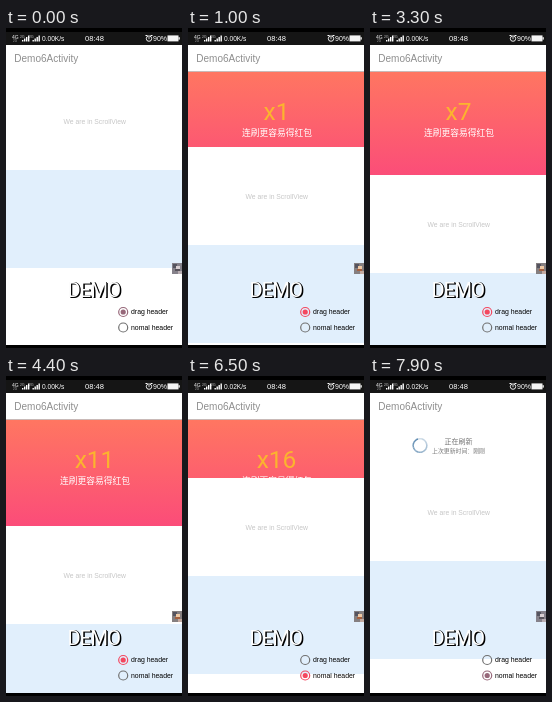
These frames come from a looping animation (176x320 px, 8000 ms). An HTML page with a canvas:

```html
<!DOCTYPE html>
<html lang="en">
<head>
<meta charset="utf-8">
<title>Pull to refresh demo</title>
<style>
html, body { margin: 0; width: 100%; height: 100%; overflow: hidden; background: #000; }
canvas { display: block; width: 176px; height: 320px; }
</style>
</head>
<body>
<canvas id="stage" width="176" height="320"></canvas>
<script>
const ctx = document.getElementById('stage').getContext('2d');
const LOOP = 8000, STEP = 100, TOP = 44, BOTTOM = 317;
const SANS = '"Liberation Sans", Arial, sans-serif';
const CJK = '"Noto Sans CJK SC", "Noto Sans CJK", sans-serif';
const ROBOTO = 'Roboto, sans-serif';

// [time, pull distance]
const PULL = [
  [0, 0], [100, 1], [300, 12], [600, 38], [900, 65], [1000, 75], [1200, 90],
  [1500, 99], [1900, 98], [2300, 102], [2800, 105], [3300, 103], [3800, 106],
  [4400, 106], [5000, 103], [5700, 105], [6200, 104], [6400, 88], [6500, 58],
  [6600, 30], [6700, 12], [6800, 3], [6900, 0], [7000, 0], [7300, 42],
  [7500, 60], [7700, 49], [7800, 45], [7900, 43]
];
// [time, swipe counter]
const COUNT = [[0, 1], [1000, 1], [1600, 2], [2100, 3], [2450, 4], [4250, 11], [5500, 15], [6100, 16]];

function sample(points, t) {
  const i = points.findIndex(p => p[0] > t);
  if (i < 0) return points[points.length - 1][1];
  const [t0, a] = points[i - 1], [t1, b] = points[i];
  return a + (b - a) * (t - t0) / (t1 - t0);
}

function rect(x, y, w, h, color) {
  ctx.fillStyle = color;
  ctx.fillRect(x, y, w, h);
}

function text(str, x, y, size, color, family = SANS, align = 'left', weight = 400) {
  ctx.font = `${weight} ${size}px ${family}`;
  ctx.textAlign = align;
  ctx.fillStyle = color;
  ctx.fillText(str, x, y);
}

function arc(x, y, r, color, width, from = 0, to = Math.PI * 2) {
  ctx.beginPath();
  ctx.arc(x, y, r, from, to);
  ctx.strokeStyle = color;
  ctx.lineWidth = width;
  ctx.stroke();
}

function dot(x, y, r, color) {
  ctx.beginPath();
  ctx.arc(x, y, r, 0, Math.PI * 2);
  ctx.fillStyle = color;
  ctx.fill();
}

function signal(x) {
  for (let i = 0; i < 4; i++) rect(x + i * 2, 12 - i * 1.5, 1.4, 1.5 + i * 1.5, '#fff');
}

function statusBar(t) {
  rect(0, 4, 176, 13, '#151515');
  text('4G', 6, 10.5, 5, '#fff');
  text('2G', 7, 14, 3, '#aaa');
  text('2G', 14, 10, 3.4, '#ccc');
  signal(16);
  text('2G', 23, 10, 3.4, '#ccc');
  signal(26.5);
  text(t < 6100 ? '0.00K/s' : '0.02K/s', 36, 13, 6.6, '#fff');
  text('08:48', 88.5, 13.2, 7.6, '#fff', SANS, 'center');
  arc(143, 10.6, 2.7, '#fff', 0.9);
  rect(142.6, 8.8, 0.8, 2.4, '#fff');
  rect(139.5, 7, 2, 1, '#fff');
  rect(144.5, 7, 2, 1, '#fff');
  text('90%', 147, 13.2, 7, '#fff');
  rect(161.5, 7.4, 11, 6, '#f4f4f4');
  rect(172.5, 9.2, 1.3, 2.4, '#f4f4f4');
}

function titleBar() {
  rect(0, 17, 176, TOP - 17, '#fff');
  text('Demo6Activity', 8.3, 34, 10, '#8e8e8e');
}

function gradientHeader(count) {
  const g = ctx.createLinearGradient(0, TOP, 0, TOP + 106);
  g.addColorStop(0, '#ff7661');
  g.addColorStop(1, '#fb4c79');
  rect(0, TOP, 176, 110, g);
  text('x' + count, 88.5, 92, 24.5, '#fbb42e', ROBOTO, 'center');
  text('连刷更容易得红包', 89, 108, 8.75, '#fff', CJK, 'center', 500);
}

function plainHeader(t, y) {
  const busy = t >= 7700;
  const label = busy ? '正在刷新' : t >= 7350 ? '松开刷新数据' : '下拉刷新';
  text(label, 88.5, y - 19.5, 7, '#707070', CJK, 'center', 500);
  text('上次更新时间：刚刚', 88.5, y - 10, 5.9, '#777', CJK, 'center', 500);
  ctx.save();
  ctx.translate(50, y - 17.5);
  if (busy) {
    ctx.rotate((t - 7900) / 1000 * Math.PI * 2);
    for (let i = 0; i < 24; i++) {
      const a = i / 24 * Math.PI * 2 - Math.PI * 0.6;
      ctx.globalAlpha = 0.25 + 0.75 * i / 24;
      arc(0, 0, 6.8, '#5685ad', 1.5, a, a + 0.27);
    }
  } else {
    if (t >= 7350) ctx.rotate(Math.PI);
    ctx.beginPath();
    ctx.moveTo(0, -6);
    ctx.lineTo(0, 6);
    ctx.moveTo(-4, 2);
    ctx.lineTo(0, 6);
    ctx.lineTo(4, 2);
    ctx.strokeStyle = '#999';
    ctx.lineWidth = 1.3;
    ctx.stroke();
  }
  ctx.restore();
}

function content(pull) {
  const y = TOP + Math.round(pull);
  rect(0, y, 176, BOTTOM - y, '#fff');
  text('We are in ScrollView', 88.7, y + 51.5, 6.8, '#c6c6c6', SANS, 'center');
  rect(0, y + 98, 176, 98, '#e1effc');
}

function radio(y, label, on, accent) {
  arc(117.2, y, 4.5, on ? accent : '#707070', 1.2);
  if (on) dot(117.2, y, 2.6, accent);
  text(label, 125, y + 2.4, 6.9, '#000');
}

function caption() {
  ctx.save();
  ctx.letterSpacing = '-0.7px';
  for (const d of [1.4, 0.8]) text('DEMO', 61.4 + d, 268.6 + d, 20, '#000', ROBOTO);
  text('DEMO', 61.4, 268.6, 20, '#fff', ROBOTO);
  ctx.restore();
}

function thumbnail(dull) {
  rect(166, 235, 10, 11, dull ? '#85818a' : '#857f80');
  rect(167, 236, 4, 4, '#55545f');
  rect(170, 238, 4, 3, dull ? '#d8cfd2' : '#efc9a4');
  rect(169, 241, 5, 2, dull ? '#57525a' : '#a5603f');
  rect(172, 243, 4, 3, dull ? '#b9aeb2' : '#c3aaa0');
}

function draw(t) {
  const pull = sample(PULL, t);
  const plain = t >= 6900;
  const dull = plain || pull === 0;
  rect(0, 0, 176, 320, '#000');
  ctx.save();
  ctx.beginPath();
  ctx.rect(0, TOP, 176, BOTTOM - TOP);
  ctx.clip();
  rect(0, TOP, 176, BOTTOM - TOP, '#fff');
  if (!plain) gradientHeader(Math.floor(sample(COUNT, t)));
  content(pull);
  if (plain && pull > 0) plainHeader(t, TOP + pull);
  ctx.restore();
  statusBar(t);
  titleBar();
  if (!dull) rect(0, TOP - 1, 176, 1, '#c9b9b7');
  thumbnail(dull);
  caption();
  const accent = dull ? '#97687a' : '#f4475f';
  radio(284, 'drag header', t < 6400, accent);
  radio(299.5, 'nomal header', t >= 6400, accent);
}

const start = performance.now();
function tick() {
  const t = (performance.now() - start) % LOOP;
  draw(Math.floor(t / STEP) * STEP);
  requestAnimationFrame(tick);
}
tick();
</script>
</body>
</html>
```
